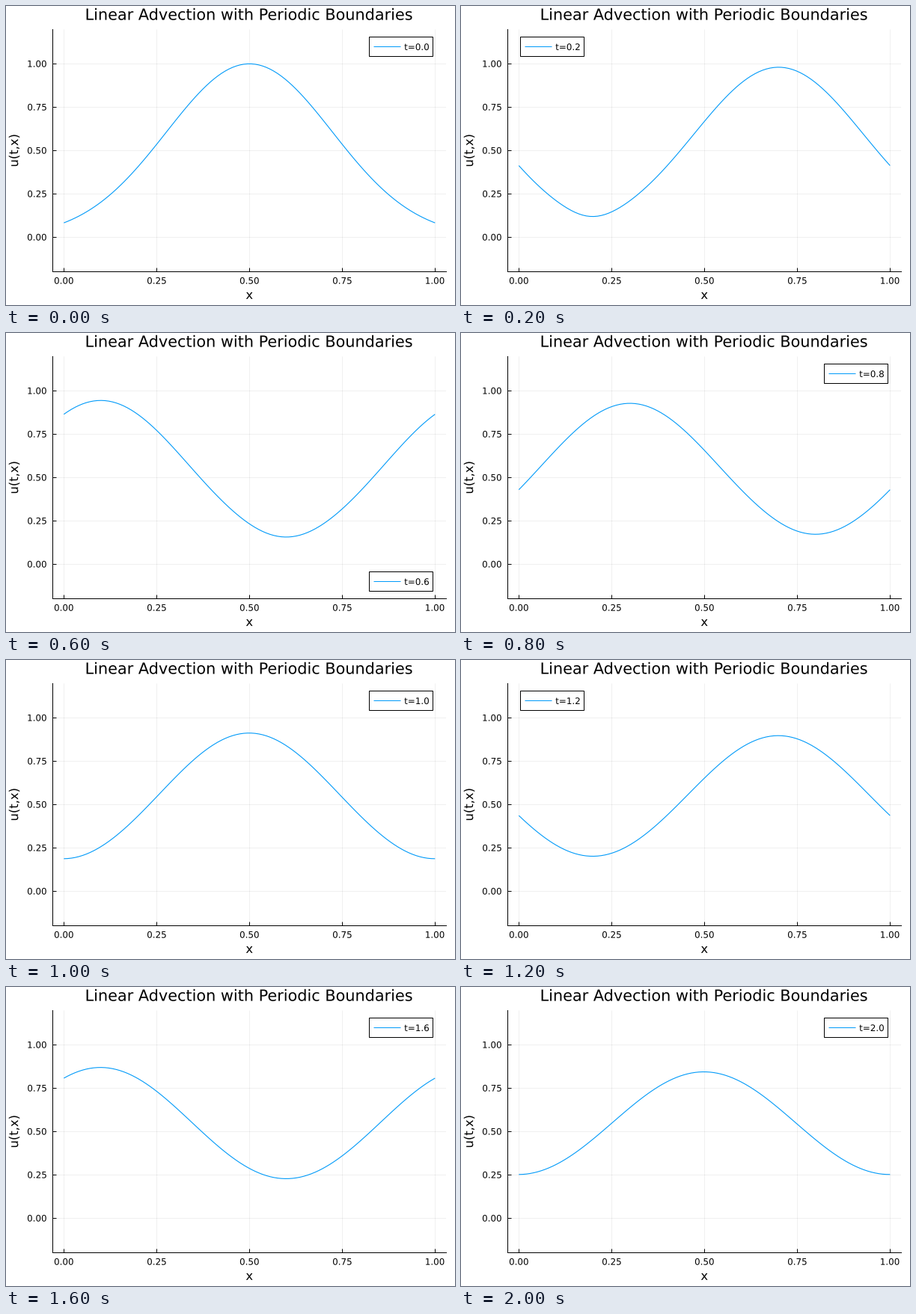
A matplotlib script that plays this animation: 600 by 400 pixels, repeating every 2100 ms.

```python
import numpy as np
import matplotlib.pyplot as plt
from matplotlib.animation import FuncAnimation
from matplotlib.patches import PathPatch, Rectangle
from matplotlib.textpath import TextPath
from matplotlib.transforms import Affine2D

W, H, DPI = 600, 400, 100
PX = 72 / DPI  # points per pixel
FRAMES, STEP_MS = 21, 100
BLUE = "#009af9"
XLIM, YLIM = (-0.03, 1.03), (-0.2, 1.2)
TICKS = np.linspace(0, 1, 5)
SMALL, MEDIUM, LARGE = 11.9, 16.35, 20.8  # text sizes in pixels

plt.rcParams.update({"font.family": "DejaVu Sans",
                     "lines.solid_capstyle": "butt"})

# First-order upwind advection on a periodic grid, solved mode by mode
N = 99
x = np.linspace(0, 1, N + 1)
start = np.fft.fft(np.exp(-10 * (x[:-1] - 0.5) ** 2))
rate = -N * (1 - np.exp(-2j * np.pi * np.fft.fftfreq(N)))


def solve(t):
    u = np.fft.ifft(start * np.exp(rate * t)).real
    return np.append(u, u[0])


def legend_shift(u):
    """Pixel shift of the legend to the first corner free of the curve."""
    top = u > YLIM[0] + 0.75 * (YLIM[1] - YLIM[0])
    left = x < XLIM[0] + 0.25 * (XLIM[1] - XLIM[0])
    right = x > XLIM[0] + 0.75 * (XLIM[1] - XLIM[0])
    if not (top & right).any():
        return 0, 0
    if not (top & left).any():
        return -406, 0
    return 0, 278


fig = plt.figure(figsize=(W / DPI, H / DPI), dpi=DPI, facecolor="white")

# Plot area
L, R, T, B = 62.4, 588.2, 31.0, 355.49
ax = fig.add_axes([L / W, 1 - B / H, (R - L) / W, (B - T) / H])
ax.set(xlim=XLIM, ylim=YLIM, xticks=TICKS, yticks=TICKS)
ax.set_axisbelow(True)
ax.grid(color="black", alpha=0.06, lw=PX)
ax.tick_params(direction="in", length=5 * PX, width=PX,
               labelbottom=False, labelleft=False)
ax.spines[["top", "right"]].set_visible(False)
ax.spines[["left", "bottom"]].set_linewidth(PX)
curve, = ax.plot(x, solve(0), color=BLUE, lw=1.1 * PX)

# Pixel-space layer for text and legend
page = fig.add_axes([0, 0, 1, 1])
page.set(xlim=(0, W), ylim=(H, 0))
page.axis("off")


def outline(px, py, s, size, align=0.5, angle=0):
    """Text outline with its baseline at (px, py); align 0 left, 1 right."""
    path = TextPath((0, 0), s, size=size)
    ink = path.get_extents()
    place = Affine2D().translate(-ink.x0 - align * ink.width, 0)
    place.scale(1, -1).rotate_deg(-angle).translate(px, py)
    return place.transform_path(path)


def text(*args, **kw):
    return page.add_patch(PathPatch(outline(*args, **kw), fc="black", lw=0,
                                    snap=False, zorder=4))


text(325.1, 18.6, "Linear Advection with Periodic Boundaries", LARGE)
text(325.2, 391.9, "x", MEDIUM)
text(16.1, 193.3, "u(t,x)", MEDIUM, angle=90)
for v in TICKS:
    text(77.3 + 496 * v, 371.7, f"{v:.2f}", SMALL)
    text(53.8, 313.6 - 232 * v, f"{v:.2f}", SMALL, align=1)

box = page.add_patch(Rectangle((485, 41), 85, 26, fc="white", ec="black",
                               lw=PX, zorder=3))
key, = page.plot([], [], color=BLUE, lw=PX, zorder=4)
label = text(532.5, 59, "t=0.0", SMALL, align=0)


def update(i):
    t = i / 10
    u = solve(t)
    curve.set_ydata(u)
    dx, dy = legend_shift(u)
    box.set_xy((485 + dx, 41 + dy))
    key.set_data([491 + dx, 527 + dx], [54 + dy, 54 + dy])
    label.set_path(outline(532.5 + dx, 59 + dy, f"t={t:.1f}", SMALL, align=0))
    return curve, box, key, label


anim = FuncAnimation(fig, update, frames=FRAMES, interval=STEP_MS,
                     repeat=True, repeat_delay=0, blit=False)
plt.show()
```
